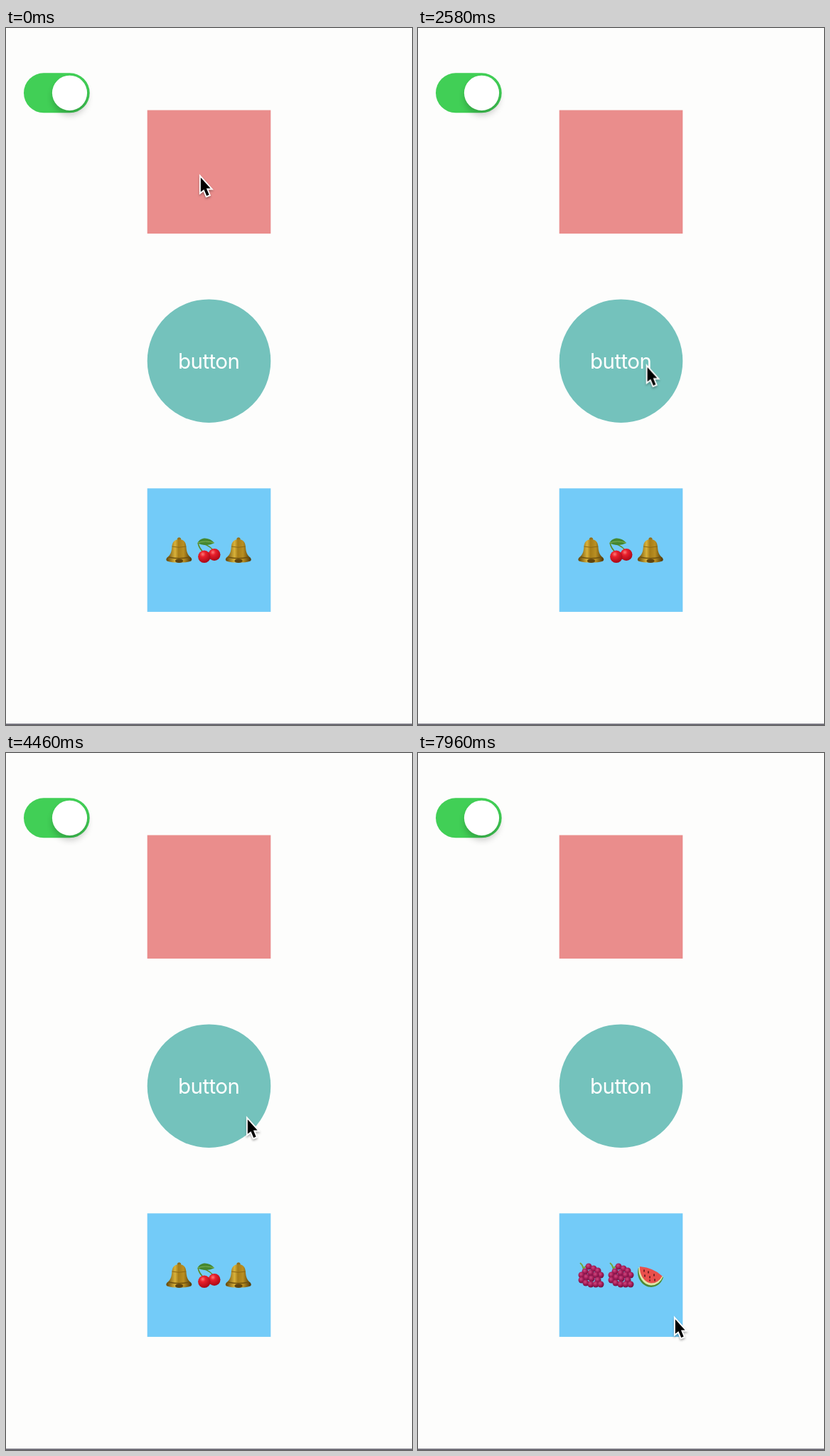
These frames come from a looping animation (571x980 px, 8000 ms). An HTML page:

```html
<!DOCTYPE html>
<html lang="en">
<head>
<meta charset="utf-8">
<title>Touch feedback</title>
<style>
  html, body { margin: 0; width: 100%; height: 100%; overflow: hidden; background: #fdfdfc; }
  svg { display: block; }
  .label { font: 400 29.5px Inter, "Open Sans", sans-serif; letter-spacing: -.55px; fill: #fff; text-anchor: middle; }

  .pad { fill: var(--off); animation: 8s infinite step-end; }
  .red { --off: #ea8d8c; --on: #d92e2a; animation-name: tap-red; }
  .teal { --off: #74c2bc; --on: #058d7f; animation-name: tap-teal; }
  .blue { --off: #73cbf8; --on: #0c9cf0; animation-name: tap-blue; }

  /* Instant highlight, short hold, eased fade */
  @keyframes tap-red {
    0% { fill: var(--off); }
    3.625% { fill: var(--on); }
    4.5% { fill: var(--on); animation-timing-function: ease-out; }
    8.875%, 100% { fill: var(--off); }
  }
  @keyframes tap-teal {
    0% { fill: var(--off); }
    26.125% { fill: var(--on); }
    27.25% { fill: var(--on); animation-timing-function: ease-out; }
    31.5%, 100% { fill: var(--off); }
  }
  @keyframes tap-blue {
    0% { fill: var(--off); }
    66.75% { fill: var(--on); }
    67.875% { fill: var(--on); animation-timing-function: ease-out; }
    72.25% { fill: var(--off); }
    94.75% { fill: var(--on); }
    95.5% { fill: var(--on); animation-timing-function: ease-out; }
    99.5%, 100% { fill: var(--off); }
  }

  .before { animation: before 8s step-end infinite; }
  .after { animation: after 8s step-end infinite; }
  @keyframes before { 0% { opacity: 1; } 67.875%, 100% { opacity: 0; } }
  @keyframes after { 0% { opacity: 0; } 67.875%, 100% { opacity: 1; } }

  .cursor { animation: move 8s ease-in-out infinite; filter: drop-shadow(0 2px 1.5px rgba(0, 0, 0, .3)); }
  @keyframes move {
    0%, 19.75% { transform: translate(272px, 206px); }
    25.75%, 30% { transform: translate(291px, 453px); }
    35% { transform: translate(362px, 500px); }
    39.625% { transform: translate(349px, 505px); }
    47.875% { transform: translate(339px, 510px); }
    57%, 63% { transform: translate(338px, 511px); }
    66.75%, 68.5% { transform: translate(350px, 662px); }
    73% { transform: translate(370px, 745px); }
    77% { transform: translate(373px, 790px); }
    82% { transform: translate(370px, 802px); }
    87% { transform: translate(360px, 805px); }
    93.75%, 100% { transform: translate(360px, 792px); }
  }
</style>
</head>
<body>
<svg width="571" height="980" viewBox="0 0 571 980">
  <defs>
    <linearGradient id="gold">
      <stop offset=".05" stop-color="#6f520f"/>
      <stop offset=".35" stop-color="#d9b23a"/>
      <stop offset=".48" stop-color="#a67d18"/>
      <stop offset=".68" stop-color="#b98f22"/>
      <stop offset=".95" stop-color="#5a400c"/>
    </linearGradient>
    <radialGradient id="cherryRed" cx=".38" cy=".3" r=".75">
      <stop offset="0" stop-color="#ff7a78"/>
      <stop offset=".3" stop-color="#e8202c"/>
      <stop offset="1" stop-color="#a50614"/>
    </radialGradient>
    <radialGradient id="grapeRed" cx=".4" cy=".35" r=".7">
      <stop offset="0" stop-color="#d2487f"/>
      <stop offset=".5" stop-color="#a31d58"/>
      <stop offset="1" stop-color="#6b0d3b"/>
    </radialGradient>

    <g id="bell">
      <circle cx="18.5" cy="2.8" r="2.6" fill="#94701a"/>
      <path d="M18.5 3C11.5 3 8.8 7 8.3 14S6.2 25 1.6 28.5Q-1 31.5 1.5 33.4Q8 35.6 18.5 35.6T35.2 33.4Q37.5 31.5 35 28.5C30.6 25 29 21 28.5 14S25.5 3 18.5 3Z" fill="url(#gold)"/>
      <path d="M4 28Q18 31.5 33 28" fill="none" stroke="#6f520f" stroke-width="1.3"/>
      <path d="M8.5 13Q18 15.5 28.3 13" fill="none" stroke="#8a6816"/>
      <ellipse cx="18.5" cy="33.2" rx="5.5" ry="2.8" fill="#5f440f"/>
    </g>

    <g id="cherry">
      <path d="M3 8Q5 17 12 22M3 8Q17 9 24 18" fill="none" stroke="#5b8a24" stroke-width="1.6"/>
      <path d="M2.5 8C6 0 18-1 26 8C19 12 9 12 2.5 8Z" fill="#458730"/>
      <path d="M2.5 8Q13 4 26 8" fill="none" stroke="#7fb154"/>
      <circle cx="26" cy="24.6" r="8.5" fill="url(#cherryRed)"/>
      <circle cx="11.8" cy="27.3" r="8.7" fill="url(#cherryRed)"/>
    </g>

    <circle id="grape" r="4.5" fill="url(#grapeRed)"/>
    <g id="grapes">
      <path d="M3 1Q8 5 8 13M8 8Q14 3 19 6" fill="none" stroke="#78a53a" stroke-width="2"/>
      <use href="#grape" x="15" y="6"/><use href="#grape" x="22" y="9"/><use href="#grape" x="28" y="12"/>
      <use href="#grape" x="10" y="13"/><use href="#grape" x="5" y="18"/><use href="#grape" x="5" y="25"/>
      <use href="#grape" x="32" y="18"/><use href="#grape" x="18" y="15"/><use href="#grape" x="25" y="18"/>
      <use href="#grape" x="12" y="21"/><use href="#grape" x="11" y="29"/><use href="#grape" x="19" y="23"/>
      <use href="#grape" x="28" y="25"/><use href="#grape" x="18" y="31"/><use href="#grape" x="25" y="31"/>
      <use href="#grape" x="32" y="31"/>
    </g>

    <g id="melon">
      <path d="M1 8C-3 22 7 35 19 35Q32 34 36 21Z" fill="#4c8c34"/>
      <path d="M1.5 7C0 20 8 32 19 32.5Q31 32 35.5 20Z" fill="#dfe6a8"/>
      <path d="M3 6C2 18 10 29 19 29.5Q29 29.5 34.5 19.5Q23 8 3 6Z" fill="#e9504c"/>
      <path d="M9 11v2M15 13v2M10 18v2M17 20v2M23 17v2M24 24v2M17 25v1" stroke="#5a1a1c" stroke-width="1.6" stroke-linecap="round"/>
    </g>

    <filter id="soft" x="-50%" y="-50%" width="200%" height="200%">
      <feGaussianBlur stdDeviation="5"/>
    </filter>
  </defs>

  <rect width="571" height="980" fill="#fdfdfc"/>
  <rect y="978" width="571" height="2" fill="#77757f"/>

  <rect x="25" y="63.3" width="92.7" height="56" rx="28" fill="#41cf56"/>
  <circle cx="90" cy="98" r="24.5" opacity=".2" filter="url(#soft)"/>
  <circle cx="89.5" cy="91.3" r="24.6" fill="#fff"/>

  <rect class="pad red" x="198.7" y="115.5" width="173.6" height="173.6"/>
  <circle class="pad teal" cx="285.5" cy="468.2" r="86.8"/>
  <text class="label" x="285.2" y="478.7">button</text>
  <rect class="pad blue" x="198.7" y="647.3" width="173.6" height="173.6"/>

  <g class="before">
    <use href="#bell" x="225" y="716"/>
    <use href="#cherry" x="267" y="716"/>
    <use href="#bell" x="308.5" y="716"/>
  </g>
  <g class="after">
    <use href="#grapes" x="225" y="716"/>
    <use href="#grapes" x="267" y="716"/>
    <use href="#melon" x="309" y="716"/>
  </g>

  <g class="cursor">
    <path d="M1.8 4.2V24.6L6.4 20.9L10.2 30L13.6 28.6L9.9 19.5H15.6Z" stroke="#fff" stroke-width="3.8" paint-order="stroke"/>
  </g>
</svg>
</body>
</html>
```
